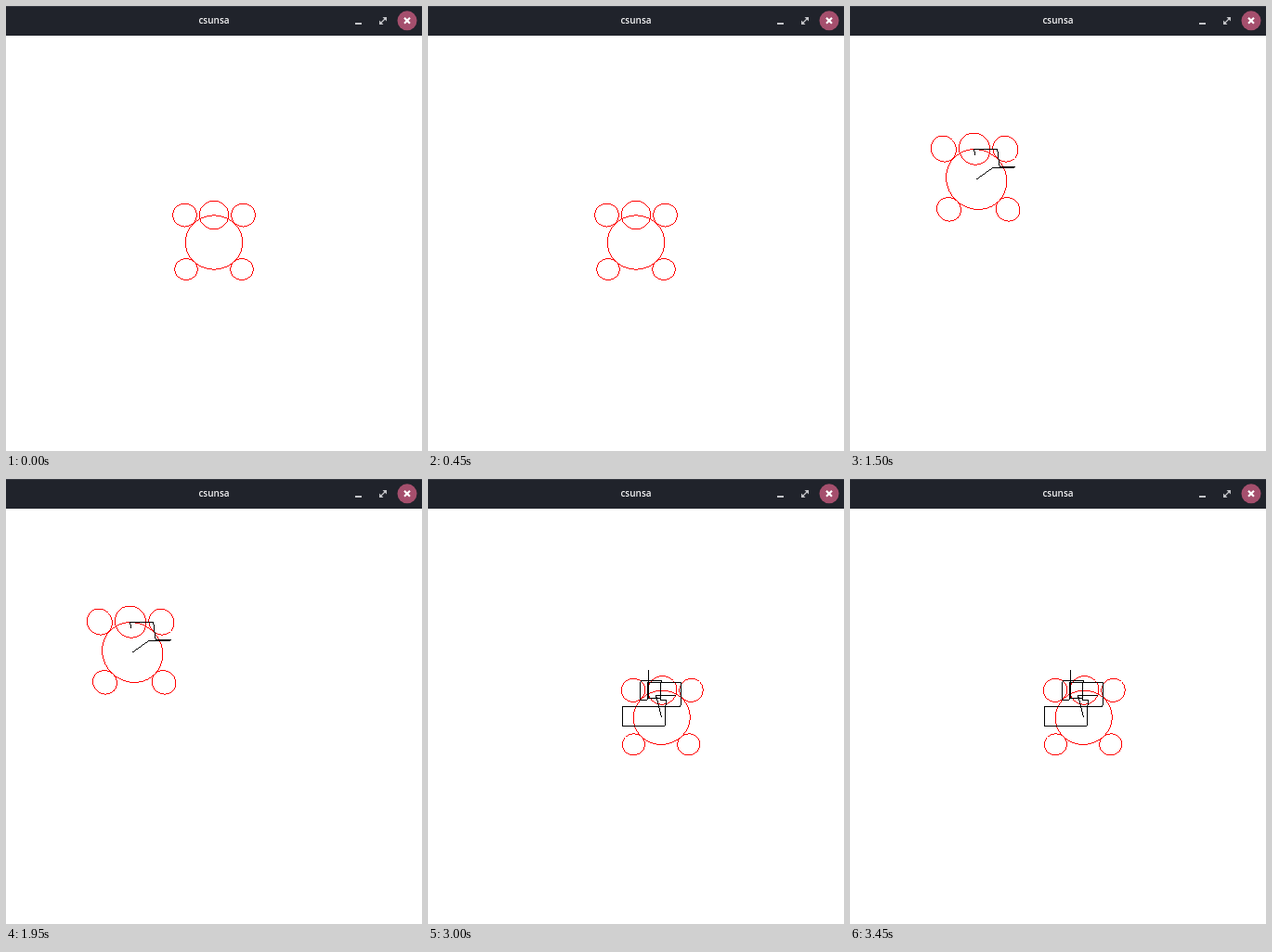
An HTML page with a canvas that plays this animation: 448 px wide and 480 px high, repeating every 3750 ms.

```html
<!DOCTYPE html>
<html lang="en">
<head>
<meta charset="utf-8">
<title>csunsa</title>
<style>
  html, body { margin: 0; width: 100%; height: 100%; overflow: hidden; background: #fff; }
  canvas { display: block; }
</style>
</head>
<body>
<canvas id="stage" width="448" height="480"></canvas>
<script>
const ctx = document.getElementById('stage').getContext('2d');
const HOLD = 750;
const TAU = Math.PI * 2;
const MOVES = { U: [0, -1], D: [0, 1], L: [-1, 0], R: [1, 0] };

// Each pose skews the turtle; its trail is a walk that ends at the body centre.
const POSES = [
  { x: 224, y: 255 },
  { x: 242.6, y: 246, start: [242.5, 222], walk: 'L3' },
  { x: 136.2, y: 187, sx: 1.057, sy: 1.115, shear: 0.07,
    start: [134.5, 161], walk: 'U7 R25 D19 R16 D1 L23' },
  { x: 350, y: 307.7, sx: 0.96, sy: 0.91, shear: -0.1,
    start: [351.5, 282.5], walk: 'U22 L34 D17 L9 U19 R22 D13 R16 D1 L22' },
  { x: 251.7, y: 257.3, sx: 0.99, shear: -0.02,
    start: [237.5, 206], walk: 'D32 L8 U21 R22 D21 R6 D28 L46 U21 R62 U26 L35 D17 R13 L5 U3 R22 L22' }
];

// Unsmoothed one-pixel line: one pixel per step along the longer axis
function line([x0, y0], [x1, y1]) {
  const steep = Math.abs(y1 - y0) > Math.abs(x1 - x0);
  let [a0, b0, a1, b1] = steep ? [y0, x0, y1, x1] : [x0, y0, x1, y1];
  if (a0 > a1) [a0, b0, a1, b1] = [a1, b1, a0, b0];
  for (let a = Math.ceil(a0 - 0.5); a < a1 - 0.5; a++) {
    const b = Math.floor(b0 + (b1 - b0) * (a + 0.5 - a0) / (a1 - a0));
    steep ? ctx.fillRect(b, a, 1, 1) : ctx.fillRect(a, b, 1, 1);
  }
}

function polyline(points) {
  for (let i = 1; i < points.length; i++) line(points[i - 1], points[i]);
}

function drawTurtle({ x, y, sx = 1, sy = 1, shear = 0 }) {
  const circle = (cx, cy, rx, ry) => {
    polyline(Array.from({ length: 61 }, (_, i) => {
      const u = cx + rx * Math.cos(i / 60 * TAU);
      const v = cy + ry * Math.sin(i / 60 * TAU);
      return [x + u * sx + v * shear, y + v * sy];
    }));
  };
  ctx.fillStyle = '#ff0000';
  circle(0, 0, 30.8, 29.1);
  circle(0, -29.5, 15.8, 15.3);
  for (const side of [-1, 1]) {
    circle(side * 31.5, -29.5, 12.8, 12.5);
    circle(side * 30, 29, 12.2, 11.4);
  }
}

function drawTrail({ x, y, shear = 0, start, walk }) {
  if (!walk) return;
  let [px, py] = start;
  const points = [start];
  for (const step of walk.split(' ')) {
    const [dx, dy] = MOVES[step[0]];
    const length = +step.slice(1);
    px += (dx + 2 * shear * dy) * length;
    py += dy * length;
    points.push([px, py]);
  }
  ctx.fillStyle = '#000';
  polyline([...points, [x, y]]);
}

function diagonal(cx, cy, dx, dy, color, width) {
  ctx.strokeStyle = color;
  ctx.lineWidth = width;
  ctx.beginPath();
  ctx.moveTo(cx - dx, cy - dy);
  ctx.lineTo(cx + dx, cy + dy);
  ctx.stroke();
}

function drawTitleBar() {
  ctx.fillStyle = '#20232b';
  ctx.fillRect(0, 0, 448, 32);
  ctx.fillStyle = '#343740';
  ctx.fillRect(0, 0, 448, 1);

  ctx.fillStyle = '#f4f4f5';
  ctx.font = '600 10px "Open Sans", "Noto Sans", sans-serif';
  ctx.textAlign = 'center';
  ctx.fillText('csunsa', 224, 19);

  const gray = '#c4c5c9';
  ctx.fillStyle = gray;
  ctx.fillRect(376, 18, 7, 2);

  // Maximize: a diagonal with a solid arrowhead at each end
  diagonal(406, 16, 3, -3, gray, 1.3);
  for (const side of [-1, 1]) {
    const tipX = 406 + side * 4, tipY = 16 - side * 4;
    ctx.beginPath();
    ctx.moveTo(tipX, tipY);
    ctx.lineTo(tipX - side * 4.5, tipY);
    ctx.lineTo(tipX, tipY + side * 4.5);
    ctx.fill();
  }

  ctx.fillStyle = '#a54f6d';
  ctx.beginPath();
  ctx.arc(432, 15.8, 10.5, 0, TAU);
  ctx.fill();
  for (const side of [-1, 1]) diagonal(432, 15.8, 3, side * 3, '#fff', 2.2);
}

function render(now) {
  const pose = POSES[Math.floor(now / HOLD) % POSES.length];
  ctx.fillStyle = '#fff';
  ctx.fillRect(0, 0, 448, 480);
  drawTitleBar();
  drawTurtle(pose);
  drawTrail(pose);
}

const start = performance.now();
function tick() {
  render(performance.now() - start);
  requestAnimationFrame(tick);
}
tick();
</script>
</body>
</html>
```
